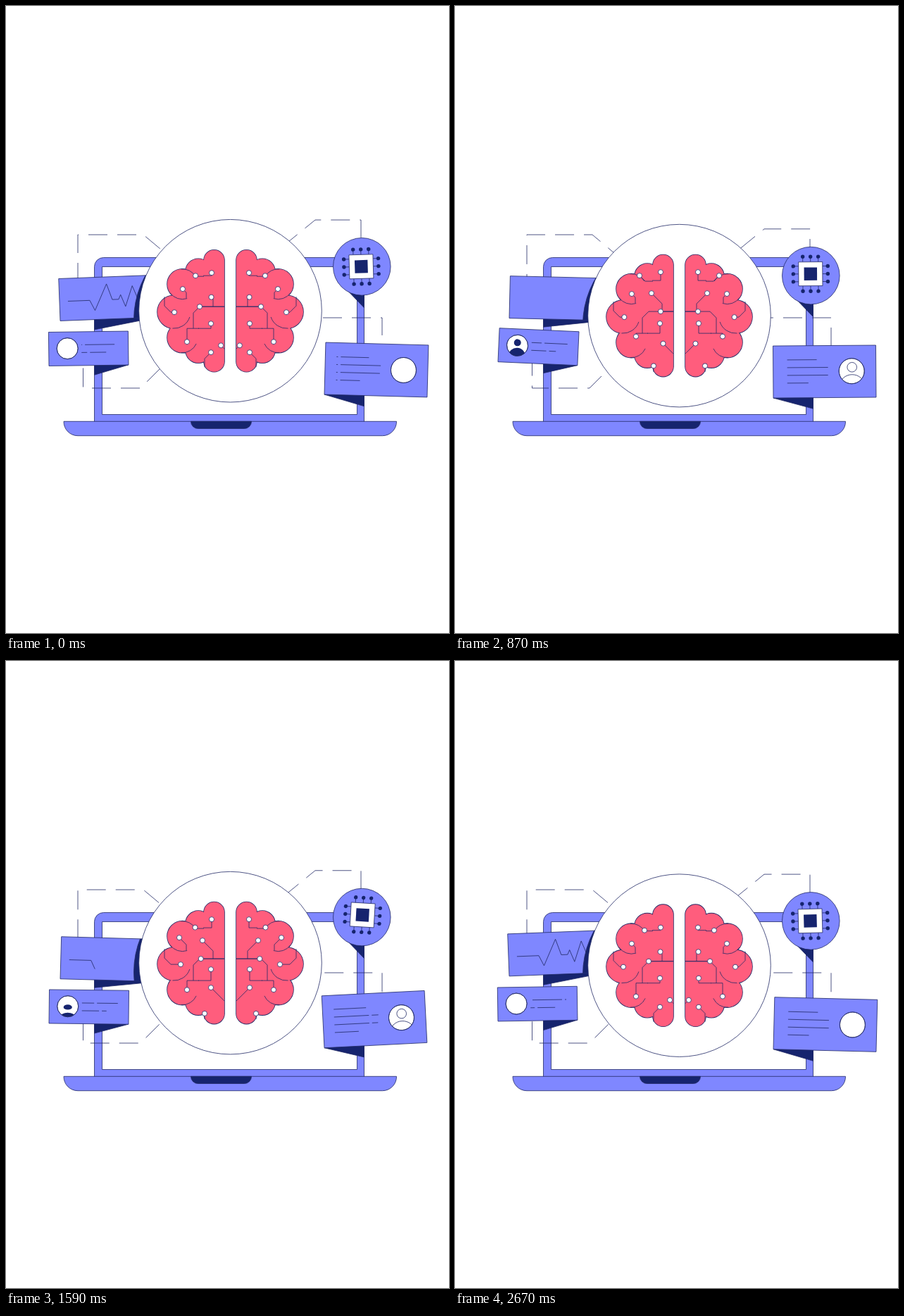
These frames come from a looping animation (629 by 891 pixels, 2700 ms). An HTML page with a canvas:

```html
<!DOCTYPE html>
<html lang="en">
<head>
<meta charset="utf-8">
<title>Brain and laptop</title>
<style>
html, body { margin: 0; width: 100%; height: 100%; overflow: hidden; background: #fff; }
canvas { display: block; }
</style>
</head>
<body>
<canvas width="629" height="891"></canvas>
<script>
const LOOP = 2700, TAU = Math.PI * 2, RAD = Math.PI / 180;
const BLUE = '#7f87ff', DARK = '#16246e', LINE = '#222a66', PINK = '#ff5d7d';
const ctx = document.querySelector('canvas').getContext('2d');

const wave = (t, shift = 0) => Math.sin((t - shift) / LOOP * TAU);
const cosWave = (t, shift = 0) => Math.cos((t - shift) / LOOP * TAU);
const ease = (t, a, b) => {
  const p = Math.min(1, Math.max(0, (t - a) / (b - a)));
  return p < .5 ? 2 * p * p : 1 - 2 * (1 - p) * (1 - p);
};
// Rises during a..b and falls again during c..d.
const pulse = (t, a, b, c, d) => ease(t, a, b) - ease(t, c, d);

function paint(fill, stroke = LINE, width = .8) {
  if (fill) { ctx.fillStyle = fill; ctx.fill(); }
  if (stroke) { ctx.strokeStyle = stroke; ctx.lineWidth = width; ctx.stroke(); }
}
function poly(pts, fill, closed = true) {
  ctx.beginPath();
  pts.forEach(p => ctx.lineTo(...p));
  if (closed) ctx.closePath();
  paint(fill);
}
const line = pts => poly(pts, null, false);
function disc(x, y, r, fill, stroke = LINE) {
  ctx.beginPath();
  ctx.arc(x, y, r, 0, TAU);
  paint(fill, stroke);
}
function dome(x, y, rx, ry, fill, stroke = LINE) {
  ctx.beginPath();
  ctx.ellipse(x, y, rx, ry, 0, 0, TAU);
  paint(fill, stroke);
}
function box(x, y, w, h, radii, fill) {
  ctx.beginPath();
  ctx.roundRect(x, y, w, h, radii);
  paint(fill);
}
function group(x, y, deg, draw) {
  ctx.save();
  ctx.translate(x, y);
  ctx.rotate(deg * RAD);
  draw();
  ctx.restore();
}

// Polyline from a start point and compass steps such as 'SE15 S11'.
function trace(x, y, steps) {
  const pts = [[x, y]];
  for (const step of steps.split(' ')) {
    const [, way, size] = step.match(/([A-Z]+)([\d.]+)/);
    x += size * (way.includes('E') - way.includes('W'));
    y += size * (way.includes('S') - way.includes('N'));
    pts.push([x, y]);
  }
  return pts;
}
// Part of a polyline between two distances along it.
function cut(pts, from, to = 1e4) {
  const out = [];
  let run = 0;
  for (let i = 1; i < pts.length; i++) {
    const [x, y] = pts[i - 1], dx = pts[i][0] - x, dy = pts[i][1] - y;
    const len = Math.hypot(dx, dy);
    const a = Math.max(0, from - run) / len, b = Math.min(len, to - run) / len;
    if (a <= 1 && b >= a) {
      if (!out.length) out.push([x + dx * a, y + dy * a]);
      out.push([x + dx * b, y + dy * b]);
    }
    run += len;
  }
  return out;
}

function laptop() {
  box(125.5, 357.5, 383, 234, [13, 13, 0, 0], BLUE);
  box(136.5, 370.5, 362, 210, 0, '#fff');
  box(82, 590.3, 472.5, 20.4, [0, 0, 20, 20], BLUE);
  box(262.5, 590.3, 86, 10.2, [0, 0, 10, 10], DARK);
}

// Dashes flow towards the big circle; start is where a dash begins at time zero.
function dashes(pts, start, t) {
  ctx.setLineDash([27, 14]);
  ctx.lineDashOffset = -(start + t / LOOP * 205);
  line(pts);
  ctx.setLineDash([]);
}
function connectors(t, chipY) {
  const y = chipY - 66.3;
  dashes([[102, 420], [102, 325], [195, 325], [232, 356]], 192, t);
  dashes(trace(109.5, 490, 'S53 E81.5 NE41'), 147.5, t);
  dashes([[504, chipY], [504, y], [439, y], [390, y + 40]], 82, t);
  dashes(trace(534, 500, 'N57 W104'), 114, t);
}

// A text line with a small gap running through it.
function ruled(x, y, len, period, phase, loops, t) {
  let at = (phase + t / LOOP * period * loops) % period - period, from = 0;
  for (; at < len + period; at += period) {
    const end = Math.min(len, at - 2);
    if (end > from) line([[x + from, y], [x + end, y]]);
    from = Math.max(from, at + 2);
  }
}
function portrait(x, y, r, draw) {
  disc(x, y, r, '#fff');
  ctx.save();
  ctx.beginPath();
  ctx.arc(x, y, r, 0, TAU);
  ctx.clip();
  ctx.translate(x, y + r);
  draw();
  ctx.restore();
  disc(x, y, r, null);
}

const BEAT = [[12, -27.5], [43, -27.5], [50, -13], [67.5, -50], [75, -27.5], [84, -27.5],
  [87, -34], [93.5, -17], [104, -46], [111, -28]];

function beatCard(t, brainY) {
  const y = 448.2 - 5.5 * wave(t, -60), deg = -2.2 * cosWave(t, -90);
  const slope = Math.tan(deg * RAD);
  poly([[125.5, y - 10], [215, y + 138 * slope], [125.5, y + 12.5]], DARK);
  group(77, y, deg, () => {
    box(0, -60, 170, 60, 0, BLUE);
    const shown = 200 * (t < 1000 ? 1 - ease(t, 110, 650) : ease(t, 1440, 1890));
    if (shown > 0) line(cut(BEAT, 0, shown));
    ctx.beginPath();
    ctx.rect(0, -60, 170, 60);
    ctx.clip();
    ctx.rotate(-deg * RAD);
    disc(311.5 - 77, brainY + 13 - y, 130, DARK);
  });
}

function userCard(t) {
  const y = 511.5 - 6.5 * wave(t), deg = .5 + 2.1 * wave(t, 270);
  const drop = 113 * Math.sin(deg * RAD);
  poly([[125.5, y - 5], [173.5, y + drop], [125.5, y + drop / 2 + 13.5]], DARK);
  group(61, y, deg, () => {
    box(0, -48, 113, 48, 0, BLUE);
    const s = pulse(t, 200, 470, 1490, 1760);
    portrait(26.5, -24.5, 15, () => {
      if (s < .02) return;
      ctx.scale(1 + .8 * (1 - s), s);
      disc(0, -19, 5, DARK, null);
      dome(0, 0, 12 * s, 11.5 * s, DARK, null);
    });
    ruled(46.5, -29.5, 51, 46, 3, 4, t);
    ruled(46.5, -18.5, 35, 46, 10, 4, t);
  });
}

function profileCard(t) {
  const y = 552.3 + 5.2 * wave(t, 20), deg = -.55 + 2.35 * cosWave(t, 220);
  poly([[452, y], [508.5, y - 10], [508.5, y + 15.5 + .8 * deg]], DARK);
  group(452, y, deg, () => {
    box(0, -74, 146, 74, 0, BLUE);
    [46, 63, 62, 34].forEach((len, i) => ruled(16, -54 + 11 * i, len, 62, 4, 3, t));
    const u = pulse(t, 200, 580, 1630, 1920);
    portrait(111.5, -37.5, 18, () => {
      if (u < .02) return;
      disc(.5, -23.5, 6.8 * Math.max(0, 2 * u - 1), null);
      dome(.5, 3 + (1 - u) * 20, 17.5, 16, null);
    });
  });
}

function chip(t, y) {
  poly([[484, y + 33], [508.5, y + 30], [508.5, y + 58.5]], DARK);
  disc(505.3, y, 40.8, BLUE);
  const lit = (t - 60) * .0285, deg = .5 - 3 * cosWave(t, 330);
  group(505 + .35 * deg, y - 1.7 + 1.7 * cosWave(t), deg, () => {
    for (let i = 0; i < 12; i++) {
      const x = (i % 3 - 1) * 11, on = i < lit && i > lit - 4.7;
      group(0, 0, Math.floor(i / 3) * 90, () => {
        line([[x, -17], [x, -24]]);
        disc(x, -24.5, 2.7, on ? '#fff' : DARK, null);
      });
    }
    box(-17, -17, 34, 34, 0, '#fff');
    ctx.fillStyle = DARK;
    ctx.fillRect(-9.2, -9.2, 18.4, 18.4);
  });
}

// The lobes mirror top to bottom around the side lobe.
const UPPER = [[295.5, -72, 14.5], [273, -56, 18], [250.5, -38, 21.5]];
const SIDE = [238.5, 1.5, 23.5];
const LOWER = UPPER.map(([x, y, r]) => [x, -y, r]).reverse();
const LOBES = [...UPPER, SIDE, ...LOWER];

const half = new Path2D();
for (const [x, y, r] of LOBES) {
  half.moveTo(x + r, y);
  half.arc(x, y, r, 0, TAU);
}
half.moveTo(310, -72);
half.lineTo(310, 72);
[...LOBES].reverse().forEach(([x, y]) => half.lineTo(x, y));
half.closePath();

// A node slides along its wire; a negative reach means it rests away from the end.
const wire = (delay, reach, ...path) => ({ delay, reach, path: trace(...path) });
const WIRES = [
  wire(470, -8, 292, -62, 'S12 W12'),
  wire(140, -10, 262, -57, 'SE8 E11'),
  wire(860, -7, 246, -36, 'SE10 S8'),
  wire(460, -17.7, 279, -32, 'SE15 S11'),
  wire(150, 17, 275, -6, 'E35'),
  wire(760, -9, 248, 2, 'W14 NW9 N13'),
  wire(600, -9, 291, 9, 'S16 W18'),
  wire(240, 14.5, 257, 44, 'N19 E17'),
  wire(630, -20, 291, 35, 'SE19'),
  wire(520, 16.5, 291, 59, 'SW9 S12')
];
const TRUNK = trace(310, -6, 'W35 SW9 S22');

function fold([x, y, r], from, to) {
  ctx.beginPath();
  ctx.arc(x, y, r, from * RAD, to * RAD);
  paint(null);
}
function brainHalf(t) {
  ctx.strokeStyle = LINE;
  ctx.lineWidth = 1.6;
  ctx.stroke(half);
  ctx.fillStyle = PINK;
  ctx.fill(half);
  fold(UPPER[2], -95, -31);
  fold(UPPER[2], 72, 145);
  fold(SIDE, 18, 95);
  fold(LOWER[0], 24, 95);
  line(TRUNK);
  const rest = WIRES.map(({ delay, reach, path }) => {
    const back = delay + 1130, u = pulse(t, delay, delay + 400, back, back + 400);
    return cut(path, reach > 0 ? reach * u : -reach * (1 - u));
  });
  rest.forEach(line);
  rest.forEach(([p]) => disc(...p, 3.5, '#fff'));
}
function brain(t, y) {
  disc(318.5, y, 129.8, '#fff');
  group(0, y, 0, () => {
    brainHalf(t);
    ctx.translate(637, 0);
    ctx.scale(-1, 1);
    brainHalf(t);
  });
}

function draw(t) {
  const brainY = 433.2 + 7.7 * wave(t), chipY = 370.8 + 13.5 * wave(t, 15);
  ctx.fillStyle = '#fff';
  ctx.fillRect(0, 0, 629, 891);
  laptop();
  connectors(t, chipY);
  beatCard(t, brainY);
  userCard(t);
  profileCard(t);
  chip(t, chipY);
  brain(t, brainY);
}

const began = performance.now();
function tick() {
  const t = (performance.now() - began) % LOOP;
  draw(Math.floor(t / 30) * 30);
  requestAnimationFrame(tick);
}
tick();
</script>
</body>
</html>
```
